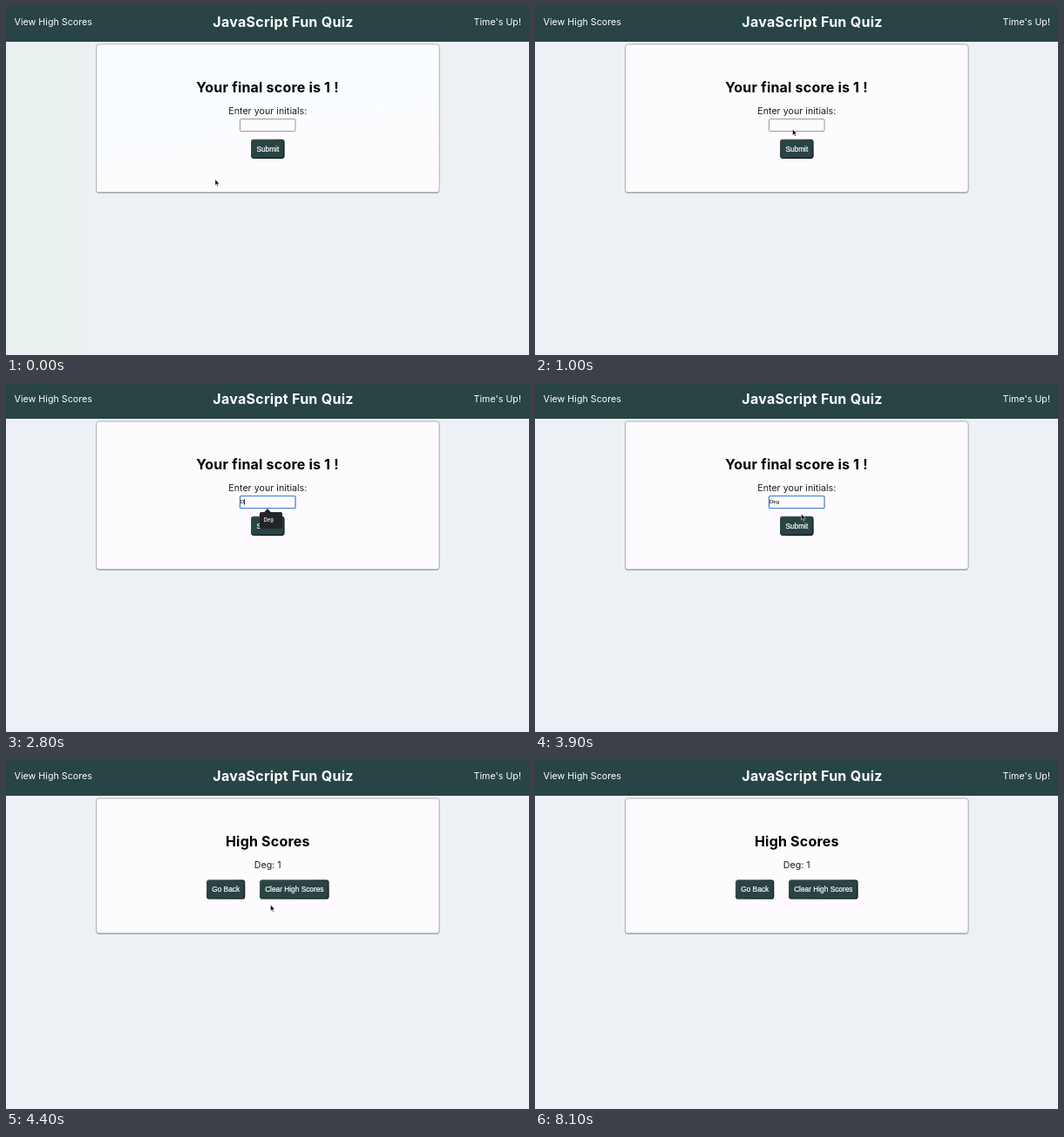
An HTML page that plays this animation: 600x400 px, repeating every 8200 ms.

```html
<!DOCTYPE html>
<html lang="en">
<head>
<meta charset="utf-8">
<title>JavaScript Fun Quiz</title>
<style>
  html, body { margin: 0; width: 100%; height: 100%; overflow: hidden; background: #edf1f5; }
  svg { display: block; width: 600px; height: 400px; }
  text { font-family: Inter, "Open Sans", sans-serif; font-size: 10.67px; letter-spacing: .03px; fill: #1c1c1c; }
  .mid { text-anchor: middle; }
  .end { text-anchor: end; }
  .big { font-size: 16px; font-weight: 700; letter-spacing: .2px; fill: #000; }
  .light { fill: #fff; }
  .label { font: 8.3px "Liberation Sans", Arial, sans-serif; letter-spacing: 0; text-anchor: middle;
    fill: #fff; stroke: #fff; stroke-width: .2px; }
  .typed { font: 6px "Liberation Sans", Arial, sans-serif; letter-spacing: 0; fill: #000; }
  .item { font-size: 5.6px; font-weight: 600; fill: #eee; }
</style>
</head>
<body>
<svg id="stage" viewBox="0 0 600 400" xmlns="http://www.w3.org/2000/svg">
  <defs>
    <linearGradient id="bevel" x1="0" y1="0" x2="1" y2="1">
      <stop offset=".3" stop-color="#434d4d"/>
      <stop offset=".7" stop-color="#0d1414"/>
    </linearGradient>
    <linearGradient id="cool" x1="0" y1="0" x2=".35" y2="1">
      <stop offset="0" stop-color="#f8fdff"/>
      <stop offset=".55" stop-color="#f9fdff"/>
      <stop offset=".8" stop-color="#fdfbfe"/>
    </linearGradient>
    <filter id="shade" x="-5%" y="-5%" width="110%" height="115%">
      <feDropShadow dx="0" dy=".6" stdDeviation=".7" flood-color="#284444" flood-opacity=".6"/>
    </filter>
  </defs>

  <rect width="600" height="400" fill="#edf1f5"/>
  <rect id="strip" y="41" width="96" height="359" fill="#e9f2f1"/>
  <rect width="600" height="41" fill="#284444"/>
  <text class="light" x="9.5" y="21.7">View High Scores</text>
  <text class="big light mid" style="letter-spacing:.28px" x="318" y="23.8">JavaScript Fun Quiz</text>
  <text class="light end" x="591" y="21.7">Time's Up!</text>

  <rect id="card" x="103.5" y="44" width="393.5" height="169.5" rx="3" fill="#fdfbfe"
        stroke="#98a5a6" stroke-width=".7" filter="url(#shade)"/>
  <rect id="tint" x="104" y="44.5" width="392.5" height="168.5" rx="3" fill="url(#cool)"/>

  <g id="form">
    <text class="big mid" x="300" y="99">Your final score is 1 !</text>
    <text class="mid" x="300.3" y="123.5">Enter your initials:</text>
    <rect id="field" x="268.5" y="129.5" width="63.5" height="14" rx="1" fill="#fdfbfe"/>
    <text id="typed" class="typed" x="269" y="138.3"></text>
    <rect id="caret" y="133" width=".8" height="6.5" fill="#000"/>
    <g id="formButtons"></g>
  </g>

  <g id="scores">
    <text class="big mid" x="300.3" y="99">High Scores</text>
    <text id="entry" class="mid" x="300.2" y="123.5"></text>
    <g id="scoreButtons"></g>
  </g>

  <path id="cursor" d="M0 0V6.9L1.6 5.4L2.7 8L3.8 7.5L2.7 5H4.8Z"
        fill="#000" stroke="#fff" stroke-width=".5" stroke-linejoin="round"/>

  <g id="popup">
    <path d="M296 148.3L300 144L304 148.3Z" fill="#232427"/>
    <rect id="popupBox" x="291" y="148" width="26" height="19" rx="1.5" fill="#232427"/>
    <g id="items"></g>
  </g>
</svg>
<script>
  const LOOP = 8200, STEP = 100;
  const NAME = 'Deg';
  const SAVED = [NAME, 'ab', 'kt', 'js', 'mm', 'rw', 'tl'];
  const ROW = 13;
  const $ = id => document.getElementById(id);
  const set = (id, attrs) => {
    for (const key in attrs) $(id).setAttribute(key, attrs[key]);
  };
  const show = (id, on) => set(id, { visibility: on ? 'visible' : 'hidden' });

  const button = (x, y, w, h, label) =>
    `<rect x="${x + .6}" y="${y + .6}" width="${w - 1.2}" height="${h - 1.2}" rx="2.5"
      fill="#284444" stroke="url(#bevel)" stroke-width="1.2"/>
     <text class="label" x="${x + w / 2}" y="${y + h / 2 + 2.7}">${label}</text>`;

  $('formButtons').innerHTML = button(281, 152.7, 38.6, 22.2, 'Submit');
  $('scoreButtons').innerHTML =
    button(230, 137.2, 44.3, 22.4, 'Go Back') +
    button(291, 137.2, 79.6, 22.4, 'Clear High Scores');
  $('entry').textContent = NAME + ': 1';
  $('items').innerHTML = SAVED.map((word, i) =>
    `<text class="item" x="295.8" y="${159.3 + i * ROW}">${word}</text>`).join('');

  // time, x, y
  const PATH = [
    [0, 240, 198.7], [800, 295.5, 141.3], [3600, 297, 143],
    [3900, 305.5, 150], [4200, 303.5, 166], [LOOP, 303.5, 166]
  ];
  const ease = k => k * k * (3 - 2 * k);

  function cursorAt(t) {
    const i = PATH.findIndex(p => p[0] > t);
    const [t0, x0, y0] = PATH[i - 1], [t1, x1, y1] = PATH[i];
    if (t0 === 800) return [x0, y0];
    const k = ease((t - t0) / (t1 - t0));
    return [x0 + (x1 - x0) * k, y0 + (y1 - y0) * k];
  }

  function draw(time) {
    const t = Math.floor(time / STEP) * STEP;
    const done = t >= 4400;
    const fade = Math.max(0, 1 - t / 800);
    set('strip', { opacity: fade });
    set('tint', { opacity: fade });
    set('card', { height: done ? 154.5 : 169.5 });
    show('scores', done);
    $('form').style.display = done ? 'none' : '';

    const focus = t >= 1400;
    set('field', { stroke: focus ? '#4279c6' : '#8f8f8f', 'stroke-width': focus ? 1.2 : .9 });

    const count = [2600, 3000, 3100].filter(s => t >= s).length;
    $('typed').textContent = NAME.slice(0, count);
    set('caret', { x: [269.4, 273.2, 276.6, 280][count] });
    show('caret', focus && t < 3200);

    const rows = t < 2800 ? SAVED.length : 1;
    show('popup', t >= 1500 && t < 3200);
    set('popupBox', { height: 6 + rows * ROW });
    [...$('items').children].forEach((el, i) => {
      el.style.display = i < rows ? '' : 'none';
    });

    show('cursor', t < 2200 || (t >= 3700 && t < 7000));
    set('cursor', { transform: `translate(${cursorAt(t)})` });
  }

  const start = performance.now();
  function tick() {
    draw((performance.now() - start) % LOOP);
    requestAnimationFrame(tick);
  }
  tick();
</script>
</body>
</html>
```
